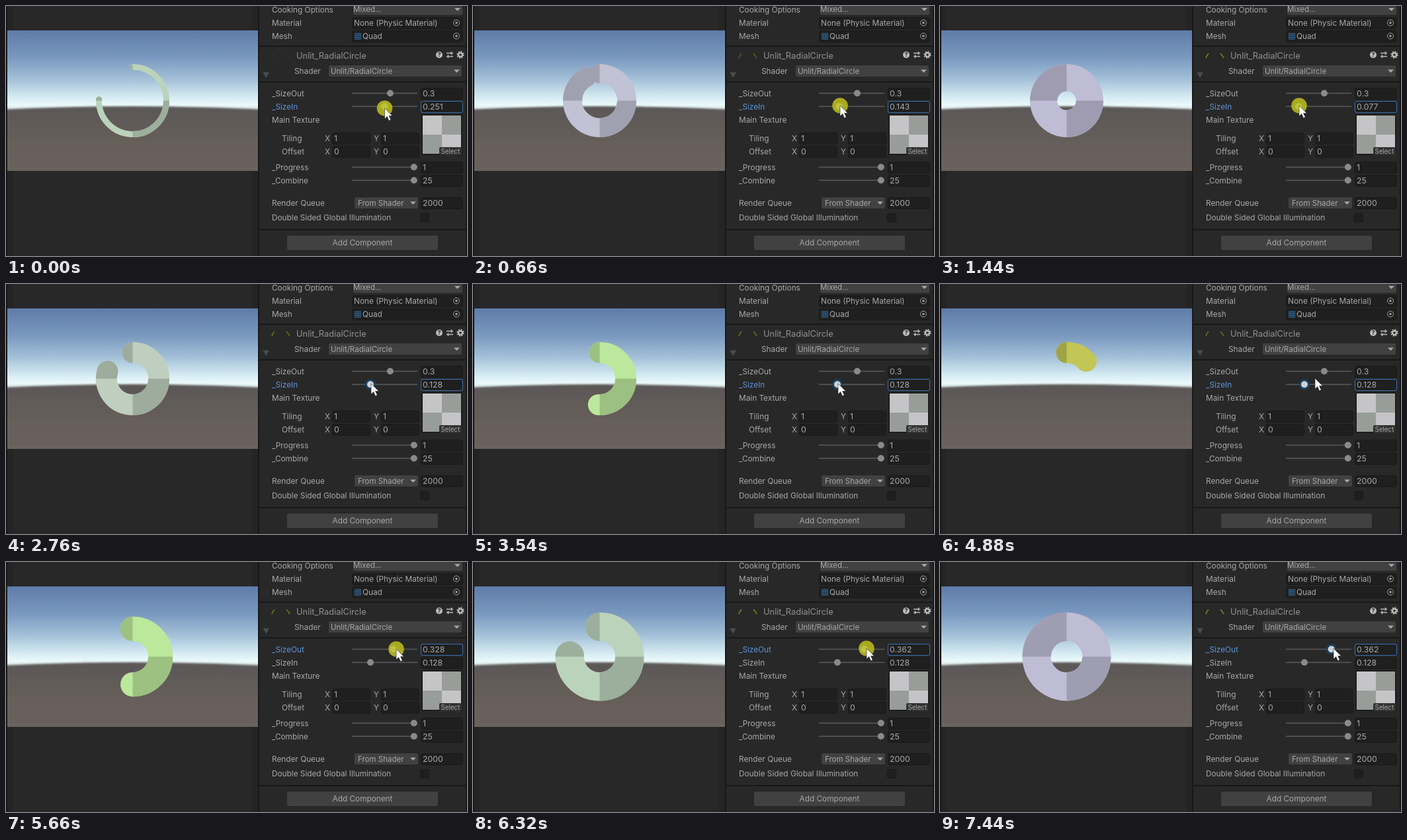
These frames come from a looping animation (697x379 px, 7540 ms). An HTML page:

```html
<!DOCTYPE html>
<html lang="en">
<head>
<meta charset="utf-8">
<title>Radial circle inspector</title>
<style>
html, body { margin: 0; width: 100%; height: 100%; overflow: hidden; background: #282828; }
svg { display: block; }
text { font: 11.8px Inter, sans-serif; fill: #a8a8a8; white-space: pre; }
text.num { font-size: 12.3px; }
text.title { font-size: 12.85px; fill: #929292; }
text.value { font-size: 11.5px; }
text.focus { fill: #5c93d6; }
.field { fill: #1f1f1f; stroke: #191919; }
.drop { fill: #414141; stroke: #262626; }
.field.on { stroke: #3a6fb0; }
.knob { fill: #8a8a8a; }
.knob.on { fill: #cfd2d4; }
.arrow { fill: #a8a8a8; }
</style>
</head>
<body>
<svg width="697" height="379" viewBox="0 0 697 379">
  <defs>
    <linearGradient id="sky" gradientUnits="userSpaceOnUse" x1="0" y1="0" x2="0" y2="119">
      <stop offset="0" stop-color="#5e7ca8"/>
      <stop offset=".35" stop-color="#7a99bf"/>
      <stop offset=".62" stop-color="#a3c0d8"/>
      <stop offset=".84" stop-color="#d3e9f1"/>
      <stop offset=".95" stop-color="#ebfafb"/>
      <stop offset="1" stop-color="#dce8ea"/>
    </linearGradient>
    <linearGradient id="ground" gradientUnits="userSpaceOnUse" x1="0" y1="115" x2="0" y2="213">
      <stop offset="0" stop-color="#5b5757"/>
      <stop offset=".5" stop-color="#655d59"/>
      <stop offset="1" stop-color="#6a625d"/>
    </linearGradient>
    <filter id="soft"><feGaussianBlur stdDeviation="1.4"/></filter>
    <clipPath id="shade"><path d="M91.5 43.5h100v100h-100zM191.5 143.5h100v100h-100z"/></clipPath>
  </defs>
  <rect width="697" height="379" fill="#282828"/>
  <path d="M0 0H10V379H0zM372 0H382V379H372z" fill="#242424"/>
  <path d="M0 0H2V379H0zM381 0H383V379H381zM695 0H697V379H695zM383 60H695V62H383zM383 114H695V116H383zM383 338H695V340H383z" fill="#181818"/>
  <svg x="2" y="37" width="379" height="213">
    <rect width="379" height="213" fill="url(#sky)"/>
    <path d="M-9 120Q189.5 110 388 120V230H-9z" fill="url(#ground)" filter="url(#soft)"/>
  </svg>
  <g fill="none" stroke-linecap="round">
    <path id="light"/>
    <g clip-path="url(#shade)"><path id="dark"/></g>
  </g>
  <g id="panel"></g>
  <path id="preview" d="M402 79Q403 75 406 72M424 72Q427 75 429 79" fill="none" stroke="#858d18" stroke-width="1.5"/>
  <g fill="none" stroke="#bbb">
    <circle cx="655" cy="74" r="5" fill="#bbb" stroke="none"/>
    <path d="M666 71.5H676M666 76.5H676M673.5 69V74M668.5 74V79" stroke-width="1.4"/>
    <circle cx="687" cy="74" r="3" stroke-width="2.4"/>
    <circle cx="687" cy="74" r="4.8" stroke-width="1.8" stroke-dasharray="1.9 1.87"/>
  </g>
  <text x="652.6" y="77.3" style="font-size:9px;font-weight:700;fill:#282828">?</text>
  <path d="M388.5 100.5H398L393.2 109z" fill="#4c4c4c"/>
  <circle id="press" r="11.8" fill="#c0c01c" opacity=".85"/>
  <path id="pointer" d="M0 0V16L3.7 12.5L6.5 18.8L9.3 17.5L6.6 11.5H11.6z" fill="#fff" stroke="#222" stroke-width=".6"/>
</svg>
<script>
const $ = id => document.getElementById(id);
const panel = $('panel');

function add(tag, attrs, content) {
  const el = document.createElementNS('http://www.w3.org/2000/svg', tag);
  for (const k in attrs) el.setAttribute(k, attrs[k]);
  if (content !== undefined) el.textContent = content;
  return panel.appendChild(el);
}
// y is the middle of the line
const label = (x, y, s, cls = '') => add('text', { x, y: y + 4.2, class: cls }, s);
const box = (x, y, w, h, cls = 'field') =>
  add('rect', { x: x + .5, y: y + .5, width: w - 1, height: h - 1, rx: 2.5, class: cls });
const field = (x, y, w, s) => ({ frame: box(x, y - 9, w, 18), text: label(x + 3, y, s, 'num') });
function dropdown(x, y, w, s, inset = 4) {
  box(x, y - 9.5, w, 19, 'drop');
  label(x + inset, y, s, 'value');
  add('path', { d: `M${x + w - 13} ${y - 2}h9l-4.5 4.5z`, class: 'arrow' });
}
const knobX = v => 528.7 + 174 * v;
function slider(y, name, x, value) {
  const title = label(402, y, name);
  add('rect', { x: 523, y: y - 1.5, width: 99, height: 1.6, fill: '#585858' });
  const halo = add('circle', { cx: x, cy: y - .7, r: 8, fill: '#1a4264', opacity: 0 });
  const knob = add('circle', { cx: x, cy: y - .7, r: 5, class: 'knob' });
  return { title, halo, knob, ...field(627, y, 64, value) };
}
function setSlider(s, v, on) {
  s.title.setAttribute('class', on ? 'focus' : '');
  s.halo.setAttribute('opacity', on ? 1 : 0);
  s.knob.setAttribute('class', on ? 'knob on' : 'knob');
  s.frame.setAttribute('class', on ? 'field on' : 'field');
  s.halo.setAttribute('cx', knobX(v));
  s.knob.setAttribute('cx', knobX(v));
  s.text.textContent = String(+v.toFixed(3));
}

label(402, 6, 'Cooking Options');
dropdown(524, 5, 167, 'Mixed...', 1);
for (const [y, name, value, x] of [[26, 'Material', 'None (Physic Material)', 526], [46, 'Mesh', 'Quad', 539]]) {
  label(402, y, name);
  box(523, y - 9, 168, 18);
  label(x, y, value);
  add('circle', { cx: 681, cy: y - .5, r: 4.5, fill: 'none', stroke: '#a0a0a0' });
  add('circle', { cx: 681, cy: y - .5, r: 1.7, fill: '#a0a0a0' });
}
add('path', { d: 'M527.5 41.5h9v9h-9zM530.5 41.5v9M533.5 41.5v9M527.5 44.5h9M527.5 47.5h9', fill: '#1d3346', stroke: '#315a7d' });
label(439, 76, 'Unlit_RadialCircle', 'title');
label(436, 99, 'Shader');
dropdown(487, 98.5, 203, 'Unlit/RadialCircle');
const sizeOut = slider(133, '_SizeOut', knobX(.3), '0.3');
const sizeIn = slider(153, '_SizeIn', knobX(.251), '0.251');
label(402, 173, 'Main Texture');
for (const [y, name, v] of [[201, 'Tiling', 1], [221, 'Offset', 0]]) {
  label(417, y, name);
  label(482, y, 'X');
  field(493, y, 58, v);
  label(556, y, 'Y');
  field(567, y, 58, v);
}
add('rect', { x: 628, y: 164, width: 62, height: 62, fill: '#1d1d1d' });
add('rect', { x: 630, y: 166, width: 58, height: 58, fill: '#999d99' });
add('path', { d: 'M630 166h29v29h-29zM659 195h29v29h-29z', fill: '#c5c5c7' });
add('rect', { x: 655, y: 214, width: 34, height: 12, rx: 2, fill: '#333' });
add('text', { x: 657.5, y: 223.5, style: 'font-size:9.7px' }, 'Select');
slider(245, '_Progress', 616.8, 1);
slider(265, '_Combine', 616.8, 25);
label(402, 299, 'Render Queue');
dropdown(526, 298.5, 98, 'From Shader', 6);
field(627, 299, 64, 2000);
label(402, 321, 'Double Sided Global Illumination');
box(626, 314, 14, 14);
box(424, 347, 230, 24, 'drop');
add('text', { x: 539, y: 363, 'text-anchor': 'middle' }, 'Add Component');

// piecewise linear keys: [position, value, value, ...]
function at(keys, p) {
  let i = 1;
  while (i < keys.length - 1 && keys[i][0] < p) i++;
  const a = keys[i - 1], b = keys[i];
  const k = Math.min(1, Math.max(0, (p - a[0]) / (b[0] - a[0])));
  return a.slice(1).map((v, j) => v + (b[j + 1] - v) * k);
}
const innerKeys = [[0, .251], [6, .143], [9, .138], [13, .077], [15, .077], [17, .072], [18, .072], [20, .121], [22, .128]];
const outerKeys = [[48, .3], [51, .328], [55, .362]];
const pointerKeys = [[0, 572.5, 155], [6, 555, 151], [9, 554, 151], [13, 543, 151], [18, 542, 151],
  [20, 550, 151], [22, 552, 151], [42, 552, 151], [44, 567, 143], [47, 582, 132], [49, 585, 132], [51, 590, 132], [55, 595, 131]];
const previewKeys = [[0, .12], [8, .7], [13, 1], [22, .8], [49, .8], [56, 1]];
const hues = [[0, 196, 178, 68], [.135, 193, 198, 84], [.194, 191, 207, 98], [.5, 188, 232, 155],
  [.75, 186, 212, 187], [.8, 191, 207, 191], [.92, 193, 194, 212], [1, 191, 188, 213]];

function drawRing(inner, outer, progress) {
  const r = (inner + outer) * 92.5;
  const end = Math.min(6.28, Math.max(.01, Math.PI * 2 * progress));
  const d = `M191.5 ${143.5 - r}A${r} ${r} 0 ${end > Math.PI ? 1 : 0} 1 ${191.5 + r * Math.sin(end)} ${143.5 - r * Math.cos(end)}`;
  const hue = at(hues, progress);
  for (const [id, k] of [['light', 1], ['dark', .83]]) {
    const el = $(id);
    el.setAttribute('d', d);
    el.setAttribute('stroke-width', (outer - inner) * 185);
    el.setAttribute('stroke', `rgb(${hue.map(c => Math.round(c * k))})`);
  }
}

function draw(ms) {
  // the picture advances nine times a second
  const step = Math.floor((ms % 7540) * .009 + .17);
  const seconds = Math.max(.05, step / 9);
  const [inner] = at(innerKeys, step), [outer] = at(outerKeys, step);
  const [x, y] = at(pointerKeys, step);
  const onOuter = step >= 48;
  const pressed = step < 23 || (onOuter && step < 67);
  drawRing(inner, outer, Math.abs(Math.sin((seconds - 4.62) / 2)));
  setSlider(sizeIn, inner, !onOuter);
  setSlider(sizeOut, outer, onOuter);
  $('preview').setAttribute('opacity', at(previewKeys, step)[0]);
  $('pointer').setAttribute('transform', `translate(${x} ${y})`);
  $('press').setAttribute('transform', `translate(${x} ${y})`);
  $('press').setAttribute('visibility', pressed ? 'visible' : 'hidden');
}

const start = performance.now();
function tick() {
  draw(performance.now() - start);
  requestAnimationFrame(tick);
}
tick();
</script>
</body>
</html>
```
